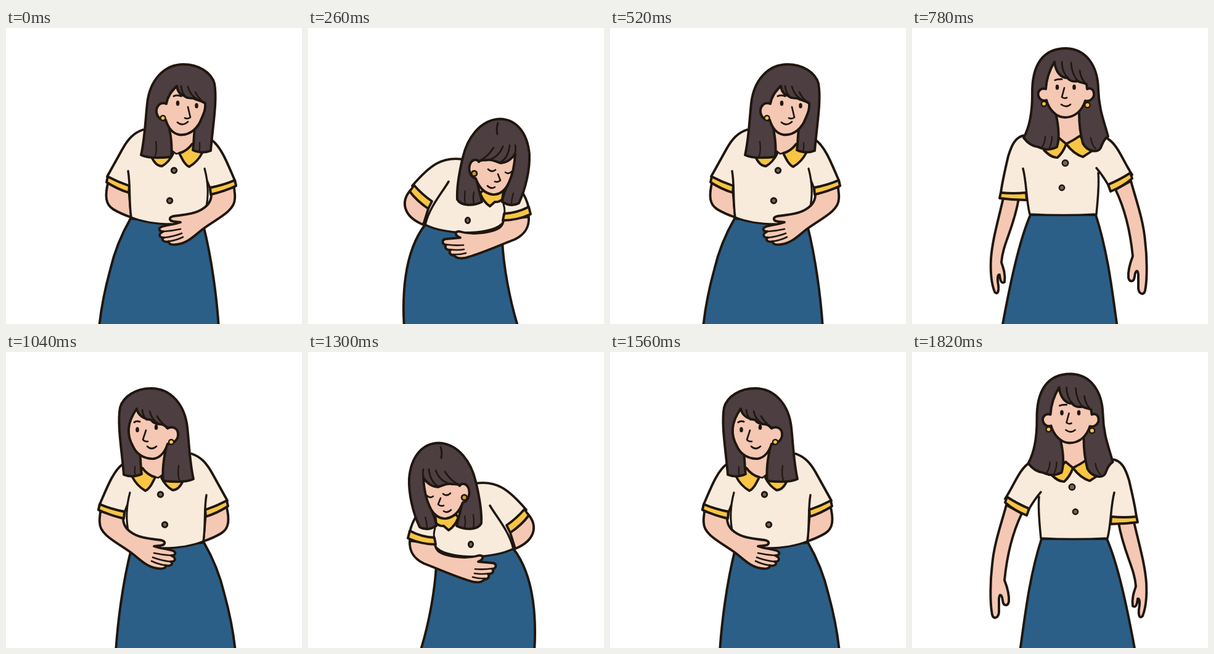
Animation, 480 px wide and 480 px high, one loop 2.08 s. Source, as an HTML page:

```html
<!DOCTYPE html>
<html lang="en">
<head>
<meta charset="utf-8">
<title>Greeting bow</title>
<style>
  html, body { margin: 0; width: 100%; height: 100%; overflow: hidden; background: #fff; }
  svg { display: block; width: 100vw; height: 100vh; }
</style>
</head>
<body>
<svg id="stage" viewBox="0 0 480 480" stroke="#1f170f" stroke-width="3.9"
     stroke-linecap="round" stroke-linejoin="round" fill="none"></svg>
<script>
const SKIN = '#f5c8b4', HAIR = '#4d3e42', SHIRT = '#f9ebdc', GOLD = '#f8c544',
      BLUE = '#2b5f88', INK = '#1f170f', BUTTON = '#6d645c';

const shape = (fill, d) => `<path d="${d}" fill="${fill}"/>`;
const bare = (fill, d) => `<path d="${d}" fill="${fill}" stroke="none"/>`;
const line = (d, w = 2.7) => `<path d="${d}" stroke-width="${w}"/>`;
const dot = (x, y, r, fill, w = 2.4) => `<circle cx="${x}" cy="${y}" r="${r}" fill="${fill}" stroke-width="${w}"/>`;
const eye = (x, y) => `<ellipse cx="${x}" cy="${y}" rx="2.8" ry="4.3" fill="${INK}" stroke="none"/>`;
const move = (x, y, s) => `<g transform="translate(${x} ${y})">${s}</g>`;
const flip = (sum, s) => `<g transform="translate(${sum} 0) scale(-1 1)">${s}</g>`;

// Leaning pose: hand resting on the stomach
const leanCuff = shape(GOLD, 'M371 247Q352 255 331 259L332 270Q354 265 373 256Z');

const leanBody =
  shape(BLUE, 'M202 309C187 335 176 362 169 392C160 425 154 455 151 486L345 486C342 440 334 375 320 320Z') +
  shape(SKIN, 'M166 248C160 272 161 286 174 294C184 300 194 304 203 307L199 260Z') +
  bare(SHIRT, 'M222 165C207 170 198 180 189 196L164 241L199 256L203 307C225 316 246 318 268 318L300 318L324 298L327 258L333 262L371 247C362 222 353 195 334 182Z') +
  line('M222 165C207 170 198 180 189 196L164 241M334 182C350 194 360 222 371 247', 3.9) +
  shape(GOLD, 'M165 241Q182 250 200 256L199 267Q180 261 163 250Z') +
  leanCuff +
  line('M198 232C202 255 199 280 203 307C225 316 246 318 268 318', 3.5) +
  line('M322 228C328 250 329 272 324 294M326 247L331 260', 3.2) +
  bare(SKIN, 'M262 155L269 199L276 203C288 200 297 194 303 187L306 150Z') +
  line('M268 198L276 204L284 202', 2.8) +
  shape(GOLD, 'M236 209C240 218 246 224 253 224C260 220 267 212 271 204L266 198Z') +
  shape(GOLD, 'M281 203C286 213 290 222 297 225C306 220 314 211 319 201L302 188C296 196 289 201 281 203Z') +
  dot(272.5, 231, 4.2, BUTTON, 3) + dot(265.5, 280, 4.2, BUTTON, 3);

const leanHair =
  shape(HAIR, 'M219 206C225 180 226 150 229 122C233 86 255 59 288 59C312 59 333 72 338 90C343 118 335 160 332 199C322 203 312 202 303 198C305 185 304 175 307 155L290 140L262 150C267 170 270 190 268 209C250 211 232 212 219 206Z') +
  line('M243 184Q245 198 242 208M314 186Q315 194 313 201', 2.2);

const leanArm =
  shape(SKIN, 'M333 270C333 284 323 292 312 297C299 303 285 303 272 305C263 307 264 313 273 314L283 315C272 319 262 319 253 322C246 325 248 330 255 330C246 334 248 340 256 340C250 344 257 348 264 346C263 351 270 352 277 351C294 349 304 338 318 327C338 311 371 298 371 277C372 270 370 264 370 258Z') +
  line('M255 330Q270 329 283 326M256 340Q272 338 285 333M264 346Q277 344 287 339') +
  leanCuff;

const leanFaceRight =
  shape(SKIN, 'M277 94C268 103 262 111 260 123C250 119 243 127 244 137C246 147 254 151 259 149C263 162 270 171 281 173C299 175 312 161 317 147C321 138 324 131 323 122C315 117 309 117 304 114C296 114 291 113 289 110C282 108 278 102 277 94Z') +
  line('M284 94Q285 106 293 113M295 95Q299 110 311 116M307 104Q313 116 323 122') +
  line('M272 110.5Q277 108 284 110.5', 3) + eye(278.5, 122) + eye(309, 126) +
  line('M295 128L299 145Q295 148 290 146M278 153Q286 160 295 152') + dot(254.5, 146, 4, GOLD);

const leanFaceLeft =
  shape(SKIN, 'M212 92C205 102 200 112 199 124C198 136 202 146 206 153C211 165 224 174 240 173C250 171 258 162 262 149C270 150 280 143 279 132C278 122 268 120 262 124C258 119 254 117 250 117C244 117 238 114 235 110C224 109 214 103 212 92Z') +
  line('M221 94Q222 104 228 110M233 96Q236 110 248 117M245 104Q252 116 262 122') +
  line('M208 114Q212 111 217 113', 3) + eye(213, 126) + eye(243.5, 122) +
  line('M227 127L222 142Q225 146 230 145M229 153Q236 160 244 153') + dot(268, 146, 4, GOLD);

// Deep bow
const bow =
  shape(BLUE, 'M208 345C206 385 197 438 182 486L367 486C370 440 369 365 333 319L285 331Z') +
  shape(SKIN, 'M356 262C374 282 368 306 336 319L327 290Z') +
  bare(SHIRT, 'M272 213C305 208 325 222 356 258L322 284L333 319C315 328 295 331 270 332C245 332 215 328 205 313L166 290C167 280 170 272 176 262Z') +
  line('M272 213C305 208 325 222 354 256M177 264C170 274 167 283 165 292', 3.9) +
  shape(GOLD, 'M351 255Q338 270 322 281L328 293Q347 280 358 265Z') +
  line('M295 249C306 268 326 290 333 319C315 328 295 331 270 332C245 332 219 328 209 318', 3.5) +
  shape(SKIN, 'M165 306C164 322 170 334 188 343C212 352 238 364 262 371C270 374 281 375 286 369C293 368 295 364 292 360C300 360 302 355 299 352C307 350 306 342 298 342L276 340C286 336 285 329 277 330C260 335 238 333 224 329C212 325 207 321 206 311Z') +
  line('M271 352Q287 353 299 351M270 359Q282 361 293 359M267 365Q278 368 287 367') +
  shape(GOLD, 'M165 290Q184 300 205 301L207 312Q184 312 162 302Z') +
  line('M206 286Q203 294 205 304', 3) +
  `<ellipse cx="264" cy="312" rx="3.6" ry="4.4" fill="${BUTTON}" stroke-width="3"/>` +
  shape(GOLD, 'M206 264L208 278Q214 283 220 282L228 289Q238 283 244 268L238 262Z') +
  shape(HAIR, 'M181 284C170 260 163 230 164 205C167 170 185 148 212 147.5C245 149 265 180 272 210C278 235 282 260 281 278C275 289 255 289 241 282C243 272 247 260 250 244L220 230L193 236C198 255 207 266 208 282C200 287 190 289 181 284Z') +
  line('M215 154Q218 163 216 172', 3) +
  line('M254 266Q256 276 254 285M268 264Q270 276 268 284M190 268Q193 278 193 285', 2.2) +
  shape(SKIN, 'M187 204C188 222 191 237 197 250C203 264 213 271 224 270C237 268 246 258 251 244C259 242 263 232 261 223C258 212 249 212 246 217C243 213 238 215 232 214C224 213 217 217 211 219C203 219 194 214 187 204Z') +
  line('M187 190Q185 199 189 207M196 190Q198 210 211 218M207 192Q214 210 231 214M222 194Q232 210 245 215') +
  line('M193 233Q198 238 203 234M219 230Q225 235 231 229M215 237L211 247Q215 251 220 249M220 258Q226 262 232 256') +
  dot(253.5, 236, 4.4, '#c79b26', 2.8);

// Upright pose
const standBody =
  shape(SKIN, 'M148 276C139 315 130 345 128 375C127 395 129 415 134 428C139 434 141 426 140 417C138 406 139 399 142 400C143 410 145 415 150 412C152 400 148 389 145 380C147 350 165 325 173 277Z') +
  shape(SKIN, 'M330 262C346 295 354 330 358 370C353 383 350 395 351 405C353 413 360 412 361 403C362 394 366 390 367 400L367 422C368 432 376 434 378 426C382 405 381 370 378 345C375 310 362 275 355 248Z') +
  shape(BLUE, 'M192 303C174 345 160 410 146 486L333 486C325 430 318 365 298 303Z') +
  bare(SHIRT, 'M184 174C167 175 161 192 156 208L144 268L186 270L191 303L299 303L303 234L318 256L357 238C342 215 334 190 318 180Z') +
  line('M184 174C167 175 161 192 156 208C151 230 146 250 144 268M318 180C334 190 342 215 357 238', 3.9) +
  shape(GOLD, 'M144 267Q165 269 185 267L186 279Q164 279 142 276Z') +
  shape(GOLD, 'M354 235Q337 246 318 254L322 265Q342 257 357 244Z') +
  line('M180 228C186 250 185 280 191 302Q245 305 299 302C301 280 304 255 302 235M299 227Q310 240 319 256', 3.5) +
  dot(248.5, 219, 4.8, BUTTON) + dot(243, 259, 4.2, BUTTON);

const standCollar =
  bare(SKIN, 'M233 135L236 180L250 189L272 177L271 135Z') +
  shape(GOLD, 'M238 178Q227 191 214 198C221 205 228 211 236 210Q245 202 250 188Z') +
  shape(GOLD, 'M250 188C258 184 265 180 272 175L294 198Q285 204 277 209Q262 204 250 188Z');

const standHead =
  shape(HAIR, 'M181 178C191 160 195 135 195 108C194 60 212 33 250 33C283 34 301 62 302 98C303 135 313 155 318 176C311 180 309 187 307 192C303 205 284 200 277 187C273 172 271 155 271 138L250 130L233 138C238 160 240 178 235 193C221 200 212 196 205 193C195 192 187 186 181 178Z') +
  line('M216 176Q216 186 211 193M227 176Q227 186 223 194M290 178Q291 189 298 196', 2.2) +
  shape(SKIN, 'M231 55C223 68 218 82 217 99C209 96 203 103 205 110C207 117 213 119 218 117C222 132 234 145 248 145C265 145 276 133 281 118C289 120 296 113 295 106C294 98 288 97 284 99L283 91C277 88 273 89 269 86C261 88 255 85 252 81C242 81 233 72 231 55Z') +
  line('M243 55Q243 72 254 82M258 56Q259 76 270 87M272 69Q274 84 283 91') +
  line('M232 84.5Q236 82.5 243 83', 3) + eye(235.5, 96) + eye(263, 96) +
  line('M247 97L243 112Q247 115 251 113M242 124Q250 130 257 124') +
  dot(214, 123, 4, GOLD) + dot(284.5, 125, 4.2, GOLD);

const LEAN_SUM = 523, STAND_SUM = 508;
const poses = {
  leanRight: leanBody + leanHair + leanFaceRight + leanArm,
  leanLeft: flip(LEAN_SUM, leanBody + leanHair) + leanFaceLeft + flip(LEAN_SUM, leanArm),
  bowRight: flip(LEAN_SUM, bow),
  bowLeft: bow,
  standLeft: standBody + standCollar + standHead,
  standRight: flip(STAND_SUM, standBody) + move(11, 0, standCollar) + move(7.5, 2.5, standHead)
};

const steps = ['leanRight', 'bowRight', 'leanRight', 'standLeft',
               'leanLeft', 'bowLeft', 'leanLeft', 'standRight'];
const STEP_MS = 260;

const stage = document.getElementById('stage');
stage.innerHTML = Object.entries(poses)
  .map(([id, art]) => `<g id="${id}" display="none">${art}</g>`).join('');

let shown = null;
function draw() {
  const next = document.getElementById(steps[Math.floor(performance.now() / STEP_MS) % steps.length]);
  if (next !== shown) {
    shown?.setAttribute('display', 'none');
    next.removeAttribute('display');
    shown = next;
  }
  requestAnimationFrame(draw);
}
draw();
</script>
</body>
</html>
```
